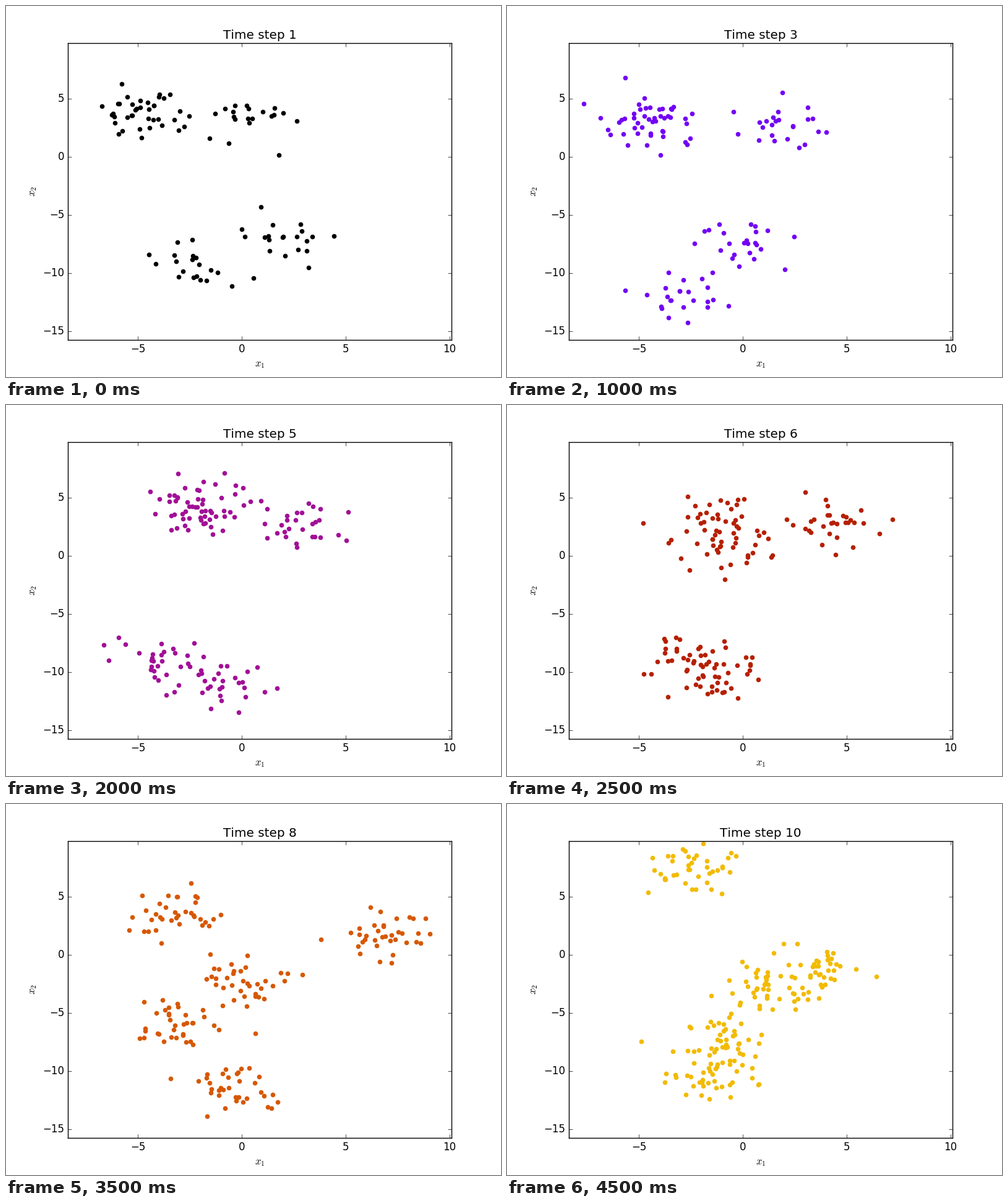
Animation, 800 px wide and 600 px high, one loop 5000 ms. Source, as a matplotlib script:

```python
import numpy as np
import matplotlib.pyplot as plt
from matplotlib.animation import FuncAnimation

STEPS = 10
INTERVAL = 500
SPREAD = (1.12, 1.08)

plt.style.use("classic")
plt.rcParams.update({
    "font.family": "DejaVu Sans",
    "text.kerning_factor": 6,
    "figure.dpi": 100,
    "savefig.dpi": 100,
    "figure.facecolor": "white",
    "savefig.facecolor": "white",
})

# Each cluster centre drifts through a few key positions (xs, ys)
KEY_STEPS = [1, 3, 5, 7, 8, 9, 10]
PATHS = [
    ([-5.3, -4.8, -2.1, -1.0, -3.2, -3.5, -2.4], [3.9, 3.6, 4.8, 1.7, 3.5, 7.0, 7.4]),
    ([-4.4, -4.2, -2.0, 1.0, 0.1, 0.9, 1.1], [3.6, 2.5, 3.6, -2.3, -2.3, -4.3, -3.0]),
    ([0.4, 1.9, 2.8, 5.9, 6.9, 6.3, 3.5], [3.3, 2.7, 2.7, 2.9, 1.7, -1.8, -1.3]),
    ([-2.3, -2.9, -0.9, -1.5, -0.4, -0.9, -1.4], [-9.4, -12, -11, -9.8, -11.5, -10.9, -10.4]),
    ([2.1, 0.0, -4.0, -1.1, -3.1, -2.3, -1.1], [-7.0, -7.4, -9.0, -8.5, -6.0, -5.6, -7.4]),
]


def blob(rng, n, centre):
    """n bell-shaped points whose mean and spread are exact."""
    z = rng.normal(size=(n, 2))
    z = (z - z.mean(axis=0)) / z.std(axis=0)
    return centre + z * SPREAD


def cloud(step):
    rng = np.random.default_rng(step)
    n = round(17.5 + 2.3 * step)
    centres = [[np.interp(step, KEY_STEPS, axis) for axis in path]
               for path in PATHS]
    return np.vstack([blob(rng, n, c) for c in centres])


clouds = [cloud(step) for step in range(1, STEPS + 1)]

fig = plt.figure(figsize=(8, 6), dpi=100)
ax = fig.add_axes([0.125, 0.1, 0.775, 0.8])
dots = ax.scatter([], [], s=20, linewidths=1)
ax.set_xlim(-8.363, 10.09)
ax.set_ylim(-15.745, 9.787)
ax.set_xticks(range(-5, 11, 5))
ax.set_yticks(range(-15, 6, 5))
ax.set_xlabel("$x_1$")
ax.set_ylabel("$x_2$")
title = ax.set_title("Time step 1")


def draw(i):
    dots.set_offsets(clouds[i])
    dots.set_color(plt.cm.gnuplot(i / STEPS))
    title.set_text(f"Time step {i + 1}")
    return dots, title


anim = FuncAnimation(fig, draw, frames=STEPS, interval=INTERVAL,
                     repeat=True, repeat_delay=0, blit=False)
plt.show()
```
